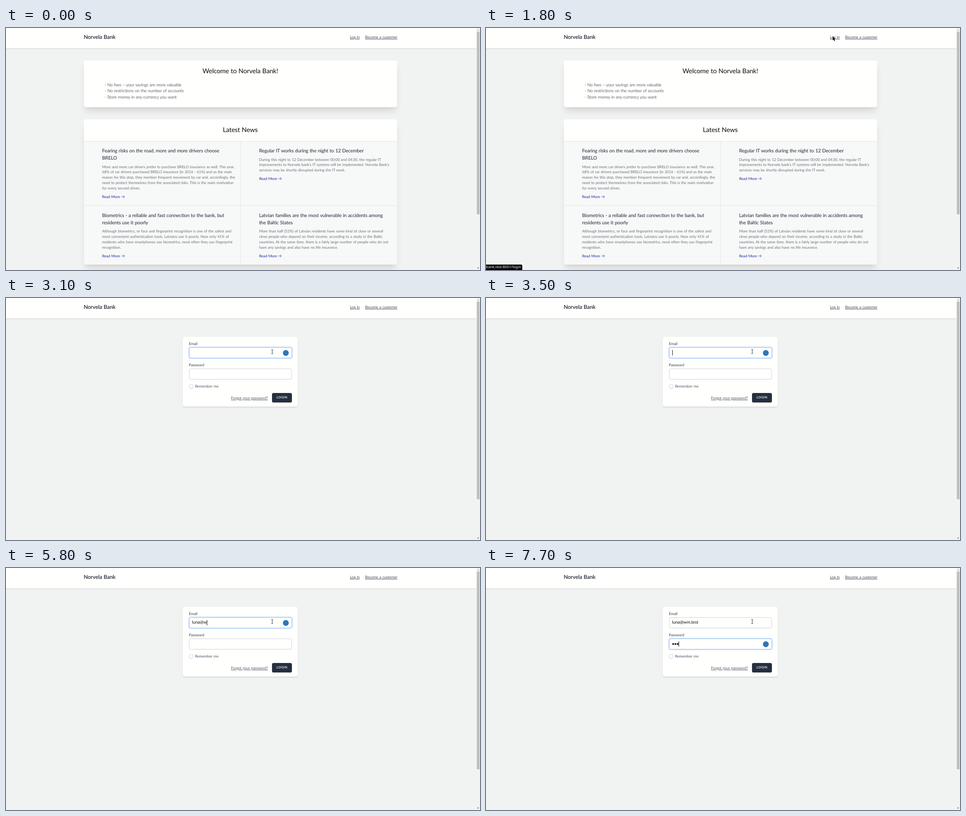
Animation of 1046x535 px, one loop 8000 ms. Source, as an HTML page:

```html
<!DOCTYPE html>
<html lang="en">
<head>
<meta charset="utf-8">
<title>Bank login</title>
<style>
  html, body { margin: 0; width: 100%; height: 100%; overflow: hidden; }
  #stage {
    position: relative; width: 1046px; height: 535px; overflow: hidden;
    background: #f1f3f3; color: #161616;
    font: 8.4px/12px Lato, "Open Sans", sans-serif;
    letter-spacing: -.018em; word-spacing: .065em;
    text-rendering: geometricPrecision;
  }
  #stage div, #stage span.t, #stage svg { position: absolute; box-sizing: border-box; }
  .t { white-space: pre; }
  .page { inset: 0; }
  .brand { font-size: 12px; font-weight: 600; color: #1f2733; }
  .link { color: #454b58; text-decoration: underline; }
  .h1 { font-size: 14.4px; color: #0c0c0c; transform: translateX(-50%); }
  .item { font-size: 9.6px; letter-spacing: -.03em; color: #696e76; }
  .h2 { font-size: 10.8px; font-weight: 600; letter-spacing: -.022em; color: #434a57; }
  .p { color: #6d727a; }
  .more { font-weight: 600; color: #4c49b2; }
  .label { color: #3f4552; }
  .soft { color: #555c68; }
  .white { background: #fffffd; }
  .card { border-radius: 4.8px; overflow: hidden;
    box-shadow: 0 12px 15px -3px rgba(0,0,0,.1), 0 6px 6px -3px rgba(0,0,0,.04); }
  .form { border-radius: 4.8px;
    box-shadow: 0 2.4px 3.6px -.6px rgba(0,0,0,.1), 0 1.2px 2.4px -.6px rgba(0,0,0,.06); }
  .head { box-shadow: 0 .6px 1.8px rgba(0,0,0,.1), 0 .6px 1.2px rgba(0,0,0,.06); }
  .cells { background: #f7f9f8; }
  .line { background: #e4e7e8; }
  .box { border: .8px solid #d0d4da; border-radius: 3.6px; background: #fffffd;
    box-shadow: 0 .6px 1.2px rgba(0,0,0,.05); }
  .box.on { border-color: #a0c5f7; box-shadow: 0 0 0 1.8px rgba(164,202,254,.5); }
  #stage .entry { display: flex; align-items: center; height: 12px; font-size: 9.6px; white-space: pre; }
  .entry i { width: 1px; height: 12px; margin-right: -1px; background: #111; }
  .entry b { width: 4px; height: 4px; margin: 0 .4px; border-radius: 50%; background: #161616; }
  .button { border-radius: 3.6px; background: #252f3f; }
  .caps { font-size: 7.2px; font-weight: 600; letter-spacing: .06em; color: #fffffd; }
  .badge { border-radius: 50%; background: #2f76b8; }
  .status { background: #000; border-radius: 0 2.5px 0 0; }
  .url { font: 8px/12px "Noto Sans", "Open Sans", sans-serif; letter-spacing: 0; word-spacing: 0; color: #fff; }
  .track { background: #f2f2f0; }
  .thumb { background: #bfc0bc; }
</style>
</head>
<body>
<div id="stage"></div>
<script>
const LOOP = 8000;
const stage = document.getElementById('stage');

function add(parent, tag, cls) {
  const el = document.createElement(tag);
  el.className = cls;
  return parent.appendChild(el);
}

function rect(parent, cls, x, y, w, h) {
  const el = add(parent, 'div', cls);
  Object.assign(el.style, { left: x + 'px', top: y + 'px', width: w + 'px', height: h + 'px' });
  return el;
}

// y is the middle of the line
function text(parent, cls, x, y, str) {
  const el = add(parent, 'span', 't ' + cls);
  el.textContent = str;
  el.style.left = x + 'px';
  el.style.top = y - 6 + 'px';
  return el;
}

function drawing(parent, x, y, w, h, body) {
  const ns = 'http://www.w3.org/2000/svg';
  const el = parent.appendChild(document.createElementNS(ns, 'svg'));
  el.setAttribute('width', w);
  el.setAttribute('height', h);
  el.style.cssText = `left:${x}px;top:${y}px;overflow:visible`;
  el.innerHTML = body;
  return el;
}

const home = add(stage, 'div', 'page');
const login = add(stage, 'div', 'page');

// Header
rect(stage, 'white head', 0, 0, 1038, 44.6);
text(stage, 'brand', 171.5, 20, 'Norvela Bank');
text(stage, 'link', 759, 20, 'Log in');
text(stage, 'link', 792.5, 20, 'Become a customer');

// Home page
rect(home, 'white card', 171.6, 72, 691.2, 102.6);
text(home, 'h1', 517, 96, 'Welcome to Norvela Bank!');
[
  '- No fees – your savings are more valuable',
  '- No restrictions on the number of accounts',
  '- Store money in any currency you want'
].forEach((s, i) => text(home, 'item', 217.4, 126.6 + i * 13.6, s));

const news = rect(home, 'white card', 171.6, 202.4, 691.2, 320.6);
rect(news, 'cells', 0, 47.6, 691.2, 273);
rect(news, 'line', 0, 47.2, 691.2, 1);
rect(news, 'line', 0, 189.8, 691.2, 1);
rect(news, 'line', 345.4, 47.6, 1, 273);
text(home, 'h1', 517, 226, 'Latest News');

function article(x, y, title, body) {
  title.forEach((s, i) => text(home, 'h2', x, y + i * 16, s));
  const top = y + title.length * 16 + 2.5;
  body.forEach((s, i) => text(home, 'p', x, top + i * 11.95, s));
  const end = top + body.length * 11.95 + 6.7;
  text(home, 'more', x, end, 'Read More');
  drawing(home, x + 42, end - 4, 9, 8,
    '<path d="M.5 4H7.8M4.6 .8L7.8 4L4.6 7.2" fill="none" stroke="#4c49b2" stroke-width=".9"/>');
}

article(212, 272, ['Fearing risks on the road, more and more drivers choose', 'BRELO'], [
  'More and more car drivers prefer to purchase BRELO insurance as well. This year,',
  '68% of car drivers purchased BRELO insurance (in 2016 - 61%) and as the main',
  'reason for this step, they mention frequent movement by car and, accordingly, the',
  'need to protect themselves from the associated risks. This is the main motivation',
  'for every second driver.'
]);
article(558.4, 272, ['Regular IT works during the night to 12 December'], [
  'During this night to 12 December between 00:00 and 04:30, the regular IT',
  'improvements to Norvela bank’s IT systems will be implemented. Norvela Bank’s',
  'services may be shortly disrupted during the IT work.'
]);
article(212, 414.5, ['Biometrics - a reliable and fast connection to the bank, but', 'residents use it poorly'], [
  'Although biometrics, or face and fingerprint recognition is one of the safest and',
  'most convenient authentication tools, Latvians use it poorly. Now only 41% of',
  'residents who have smartphones use biometrics, most often they use fingerprint',
  'recognition.'
]);
article(558.4, 414.5, ['Latvian families are the most vulnerable in accidents among', 'the Baltic States'], [
  'More than half (52%) of Latvian residents have some kind of close or several',
  'close people who depend on their income, according to a study in the Baltic',
  'countries. At the same time, there is a fairly large number of people who do not',
  'have any savings and also have no life insurance.'
]);

// Login page
rect(login, 'white form', 389.8, 85.6, 254.6, 154);
text(login, 'label', 403.4, 100.6, 'Email');
text(login, 'label', 403.4, 147.8, 'Password');
const fields = [109, 156.2].map(y => rect(login, 'box', 403.6, y, 227.4, 24.2));
const [mail, pass] = [115, 162.3].map(y => {
  const entry = rect(login, 'entry', 410.6, y, 190, 12);
  const value = add(entry, 'span', '');
  return { entry, value, caret: add(entry, 'i', '') };
});
const dots = [0, 1, 2].map(() => {
  const dot = document.createElement('b');
  pass.entry.insertBefore(dot, pass.caret);
  return dot;
});
const badge = rect(login, 'badge', 611, 114.6, 13, 13);
rect(login, 'box', 403.6, 191, 9.2, 9.2).style.borderRadius = '2.4px';
text(login, 'soft', 417, 195, 'Remember me');
text(login, 'soft link', 496.6, 220.5, 'Forgot your password?');
const button = rect(login, 'button', 587, 210.2, 44, 20.4);
text(login, 'caps', 597, 220.4, 'LOGIN');

// Browser parts
rect(stage, 'track', 1038, 0, 8, 535);
const thumb = rect(stage, 'thumb', 1039, 8, 6.4, 404);
drawing(stage, 1038, 0, 8, 535,
  '<path d="M2 5.2L4 3L6 5.2Z" fill="#a2a2a0"/><path d="M2 529.8L4 532L6 529.8Z" fill="#4c4c4a"/>');
const status = rect(stage, 'status', 0, 523, 80, 12);
const url = text(stage, 'url', 0, 529, 'bank.test:8001/login');

const outline = 'stroke="#fff" stroke-width="1.2" paint-order="stroke" fill="#111"';
const pointers = {
  arrow: `<path d="M0 0V9.6L2.2 7.6L3.8 11L5.4 10.3L3.9 7H6.8Z" ${outline}/>`,
  hand: `<path d="M-.8 .6Q0 -.6 .8 .6V4L5 5Q6.4 5.4 6 7L5 10H0L-2.8 6.6Q-2.4 5.4 -.8 6.6Z"
    fill="#fff" stroke="#111" stroke-width=".8"/>`,
  beam: '<path d="M-2 -4.6Q0 -4.6 0 -3.6Q0 -4.6 2 -4.6M0 -3.6V3.6M-2 4.6Q0 4.6 0 3.6Q0 4.6 2 4.6" fill="none" stroke="#222" stroke-width=".9"/>'
};
for (const kind in pointers) pointers[kind] = drawing(stage, 0, 0, 1, 1, pointers[kind]);

// Timelines: [start, value...]
const pointerSteps = [
  [0, ''], [800, 'arrow', 759, 13], [900, 'arrow', 762, 15], [1000, 'hand', 766, 18],
  [1800, 'arrow', 765, 18], [2200, 'arrow', 638.4, 79.6], [2400, 'arrow', 630, 90],
  [2500, 'arrow', 619, 102], [2600, 'beam', 606, 113], [2700, 'beam', 597, 117],
  [2800, 'beam', 589, 119], [2900, 'beam', 585, 119.4], [3100, 'beam', 587.5, 118.9],
  [3400, 'beam', 587.5, 118.3]
];
const statusSteps = [[0, 0], [1200, .6], [1500, 1], [2200, .57], [2400, .25], [2500, 0]];
const caretSteps = [[0, 1], [2700, 0], [3400, 1]];
const dotSteps = [[0, 0], [7300, 1], [7700, 3]];
const keyTimes = [3800, 4300, 4900, 5000, 5500, 5800, 5900, 6100, 6200, 6300, 6500, 6600];
const address = 'luna@wm.test';

const at = (steps, t) => steps.filter(s => s[0] <= t).pop();
const show = (el, on) => { el.style.visibility = on ? 'visible' : 'hidden'; };

function render(t) {
  const onLogin = t >= 2200, onPass = t >= 7000;
  home.style.display = onLogin ? 'none' : '';
  login.style.display = onLogin ? '' : 'none';
  thumb.style.height = (onLogin ? 437 : 404) + 'px';

  fields[0].classList.toggle('on', !onPass);
  fields[1].classList.toggle('on', onPass);
  mail.value.textContent = address.slice(0, keyTimes.filter(k => k <= t).length);
  const lit = onLogin && at(caretSteps, t)[1];
  show(mail.caret, lit && !onPass);
  show(pass.caret, lit && onPass);
  const count = at(dotSteps, t)[1];
  dots.forEach((dot, i) => { dot.style.display = i < count ? '' : 'none'; });
  // Inherits the hidden login page outside its time
  badge.style.visibility = t >= 2500 ? 'inherit' : 'hidden';
  badge.style.top = (onPass ? 161.8 : 114.6) + 'px';
  button.style.background = t < 2400 ? '#2e3644' : '#252f3f';

  const alpha = at(statusSteps, t)[1];
  status.style.opacity = alpha;
  url.style.opacity = Math.min(1, alpha * 1.6);

  const [, kind, x, y] = at(pointerSteps, t);
  for (const name in pointers) {
    show(pointers[name], name === kind);
    if (name === kind) pointers[name].style.transform = `translate(${x}px, ${y}px)`;
  }
}

const start = performance.now();
function tick() {
  render((performance.now() - start) % LOOP);
  requestAnimationFrame(tick);
}
tick();
</script>
</body>
</html>
```
